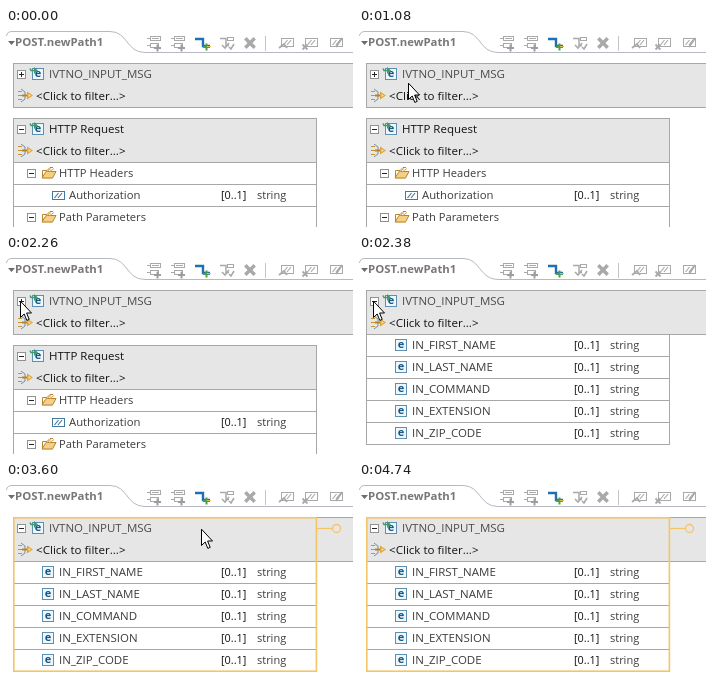
Write an HTML page with a canvas that moves like this. It is 347 by 199 pixels and loops after 5550 ms.

```html
<!DOCTYPE html>
<html lang="en">
<head>
<meta charset="utf-8">
<title>Mapping editor</title>
<style>
html, body { margin: 0; width: 100%; height: 100%; overflow: hidden; background: #fff; }
canvas { display: block; }
</style>
</head>
<body>
<canvas id="stage" width="347" height="199"></canvas>
<script>
const ctx = document.getElementById('stage').getContext('2d');
const LOOP = 5550, EXPAND = 2380, SELECT = 2670, LEAVE = 4740;
const FONT = '"Open Sans", "Noto Sans", sans-serif';
const GRAY = '#a9a9a9', RULE = '#a7a7a7', BLUE = '#1f6fb5', GOLD = '#f3c566', INK = '#3c3c3c';

// time, x, y of the pointer tip
const POINTER = [
  [270, 323, 95], [390, 302, 86], [540, 254, 80], [660, 204, 75],
  [810, 132, 69], [930, 66, 64], [1080, 49, 54], [1200, 34, 47],
  [1330, 24, 43], [1470, 20, 43], [1620, 18, 44], [1740, 16, 44],
  [1860, 14, 45], [3060, 18, 45], [3180, 28, 46], [3300, 43, 46],
  [3460, 92, 46], [3600, 195, 46], [3760, 251, 52], [3900, 287, 61],
  [4050, 316, 84], [4200, 322, 108], [4320, 326, 137], [4440, 325, 165],
  [4600, 319, 195]
];
const FIELDS = ['IN_FIRST_NAME', 'IN_LAST_NAME', 'IN_COMMAND', 'IN_EXTENSION', 'IN_ZIP_CODE'];

function rect(x, y, w, h, color) {
  ctx.fillStyle = color;
  ctx.fillRect(x, y, w, h);
}

function frame(x, y, w, h, color) {
  ctx.strokeStyle = color;
  ctx.lineWidth = 1;
  ctx.strokeRect(x + 0.5, y + 0.5, w - 1, h - 1);
}

function line(points, color, width = 1) {
  ctx.strokeStyle = color;
  ctx.lineWidth = width;
  ctx.beginPath();
  points.forEach(([x, y]) => ctx.lineTo(x, y));
  ctx.stroke();
}

function shape(points, fill) {
  ctx.fillStyle = fill;
  ctx.beginPath();
  points.forEach(([x, y]) => ctx.lineTo(x, y));
  ctx.closePath();
  ctx.fill();
}

function label(str, x, y, color = INK, size = 11.5, weight = 400) {
  ctx.font = `${weight} ${size}px ${FONT}`;
  ctx.fillStyle = color;
  ctx.fillText(str, x, y);
}

function at(x, y, draw) {
  ctx.save();
  ctx.translate(x, y);
  draw();
  ctx.restore();
}

function plus(x, y, color) {
  rect(x - 3, y - 1, 7, 2, color);
  rect(x - 0.5, y - 3.5, 2, 7, color);
}

function cross(x, y, r, width) {
  line([[x - r, y - r], [x + r, y + r]], GRAY, width);
  line([[x - r, y + r], [x + r, y - r]], GRAY, width);
}

function toggle(x, y, open) {
  rect(x, y, 9, 9, '#fff');
  frame(x, y, 9, 9, '#919191');
  rect(x + 2, y + 4, 5, 1, '#222');
  if (!open) rect(x + 4, y + 2, 1, 5, '#222');
}

function element(x, y) {
  rect(x, y, 12, 12, '#eef7fc');
  frame(x, y, 12, 12, '#5b8fb3');
  label('e', x + 2.7, y + 9.3, '#12557f', 11, 700);
}

function inputIcon(x, y) {
  element(x + 2, y);
  line([[x, y + 0.5], [x + 1, y + 2.5], [x + 4, y + 2.5]], '#3f9a6a', 1.5);
  shape([[x + 4, y - 1], [x + 8, y + 2.5], [x + 4, y + 6]], '#3f9a6a');
}

function filterIcon(x, y) {
  for (const d of [2.5, 6.5, 10.5]) line([[x, y + d], [x + 4, y + d]], '#c8922f');
  line([[x + 3, y], [x + 7, y + 3], [x + 7, y + 10], [x + 3, y + 13]], '#6d8eb0');
  line([[x + 4, y + 6.5], [x + 11, y + 6.5]], '#b98322', 2);
  shape([[x + 9, y + 2.5], [x + 15, y + 6.5], [x + 9, y + 10.5]], '#dfa53b');
  shape([[x + 10.5, y + 5], [x + 13, y + 6.5], [x + 10.5, y + 8]], '#fbe3a8');
}

function folder(x, y) {
  line([[x + 1.5, y + 10], [x + 1.5, y + 3.5], [x + 6, y + 3.5], [x + 9, y + 0.5], [x + 12, y + 0.5]], '#b8842e');
  shape([[x + 5, y + 4], [x + 15, y + 4], [x + 11.5, y + 11.5], [x + 1, y + 11.5]], '#f4cf86');
  line([[x + 1, y + 11], [x + 5, y + 4.5], [x + 15, y + 4.5], [x + 11.5, y + 11], [x + 1, y + 11]], '#b8842e');
  line([[x + 4, y + 6], [x + 10, y + 1.5]], '#d8a64e');
  line([[x + 8, y + 5], [x + 13, y + 1.5]], '#d8a64e');
}

function slashBox(x, y, w, h, color) {
  frame(x, y, w, h, color);
  for (const d of [2.5, 6]) line([[x + d, y + h - 2], [x + d + 4, y + 2]], color, 1.2);
}

function docIcon(x) {
  at(x, 15, () => {
    frame(-4, -7, 11, 5, GRAY);
    rect(-2, -5, 7, 1, GRAY);
    frame(-4, 0, 9, 5, GRAY);
    rect(-7, -5, 3, 1, GRAY);
    rect(-7, 2, 3, 1, GRAY);
    plus(3, 5, '#9d9d9d');
  });
}

function checkIcon(x) {
  at(x, 15, () => {
    line([[-7, -4.5], [-1, -4.5], [-1, 2.5], [2, 2.5]], GRAY, 1.5);
    frame(0, -6, 7, 4, GRAY);
    line([[-5, 2], [-2, 5], [2, 0]], GRAY, 1.6);
    line([[2, 4], [4, 6], [7, 1]], GRAY, 1.6);
  });
}

function toolbar() {
  [148, 172].forEach(docIcon);
  at(197, 15, () => {
    line([[-8, -4], [0, -4], [0, 3], [7, 3]], BLUE, 2.4);
    plus(3, 4, '#4f9d4b');
    rect(4, 3, 4, 1, '#e3bf45');
  });
  checkIcon(221);
  cross(244, 15, 4.7, 3.4);
  rect(259, 8, 1, 15, '#c4c4c4');
  [280, 304, 329].forEach(x => slashBox(x - 5, 10, 13, 9, GRAY));
  line([[273, 20], [278, 16], [281, 20]], GRAY, 1.8);
  cross(299, 19, 2.5, 1.8);
  line([[330, 19], [336, 10]], GRAY, 2);
}

function tab() {
  ctx.strokeStyle = '#b5b9c3';
  ctx.lineWidth = 1;
  ctx.beginPath();
  ctx.moveTo(0.5, 8);
  ctx.quadraticCurveTo(1, 3.5, 6, 3.5);
  ctx.lineTo(104, 3.5);
  ctx.bezierCurveTo(122, 3.5, 120, 24.5, 139, 24.5);
  ctx.lineTo(347, 24.5);
  ctx.stroke();
  shape([[2, 13], [9, 13], [5.5, 17]], '#6c6c6c');
  label('POST.newPath1', 9, 18, '#777', 11.4, 700);
}

// Header band with its top and bottom rules, 45 px high
function header(name, open, width, color) {
  rect(7, 0, width, 45, '#e6e6e6');
  rect(7, 0, width, 1, RULE);
  rect(7, 44, width, 1, RULE);
  toggle(11, 7, open);
  inputIcon(24, 5);
  label(name, 43, 15, color, 11.5);
  filterIcon(12, 26);
  label('<Click to filter...>', 30, 37, '#111', 11.6);
}

function rows(count, draw) {
  for (let i = 0; i < count; i++) {
    const y = 44 + 22 * i;
    draw(i, y);
    rect(7, y + 22, 304, 1, RULE);
  }
  rect(310, 44, 1, 22 * count + 1, RULE);
}

function occurs(y) {
  label('[0..1]', 215, y, '#111', 10.9);
  label('string', 251, y, INK, 11);
}

function inputPanel(open) {
  at(0, 35, () => {
    header('IVTNO_INPUT_MSG', open, 340, '#4b4b4b');
    if (open) {
      rows(FIELDS.length, (i, y) => {
        element(36, y + 5);
        label(FIELDS[i], 53, y + 15);
        occurs(y + 15);
      });
    }
    rect(7, 0, 1, open ? 155 : 45, RULE);
  });
}

function group(name, y) {
  toggle(21, y + 7, true);
  folder(35, y + 5);
  label(name, 53, y + 15, INK, 11.2);
}

function requestPanel() {
  at(0, 90, () => {
    header('HTTP Request', true, 304, '#111');
    rows(3, (i, y) => {
      if (i === 0) group('HTTP Headers', y);
      if (i === 2) group('Path Parameters', y);
      if (i === 1) {
        slashBox(46, y + 7, 13, 9, '#44789c');
        label('Authorization', 63, y + 15, INK, 11.3);
        occurs(y + 15);
      }
    });
    frame(7, 0, 304, 125, RULE);
  });
}

function selection() {
  ctx.strokeStyle = GOLD;
  ctx.lineWidth = 1.6;
  ctx.strokeRect(7.8, 35.8, 302.6, 153.4);
  line([[311, 46.5], [326, 46.5]], GOLD, 1.3);
  ctx.beginPath();
  ctx.arc(330.5, 46.5, 4, 0, Math.PI * 2);
  ctx.stroke();
}

function pointer(t) {
  if (t < POINTER[0][0] || t >= LEAVE) return;
  const [, x, y] = POINTER.filter(p => p[0] <= t).pop();
  at(x, y, () => {
    ctx.beginPath();
    [[0.5, 1.2], [0.5, 17.5], [4.2, 14], [6.8, 20.4], [9.2, 19.4], [6.6, 13], [11.5, 13]]
      .forEach(([px, py]) => ctx.lineTo(px, py));
    ctx.closePath();
    ctx.fillStyle = '#fff';
    ctx.fill();
    ctx.strokeStyle = '#000';
    ctx.lineWidth = 1;
    ctx.stroke();
  });
}

function render(now) {
  const t = now % LOOP;
  const open = t >= EXPAND;
  rect(0, 0, 347, 199, '#fff');
  tab();
  toolbar();
  inputPanel(open);
  if (!open) requestPanel();
  if (t >= SELECT) selection();
  pointer(t);
}

function tick() {
  render(performance.now());
  requestAnimationFrame(tick);
}
tick();
</script>
</body>
</html>
```
